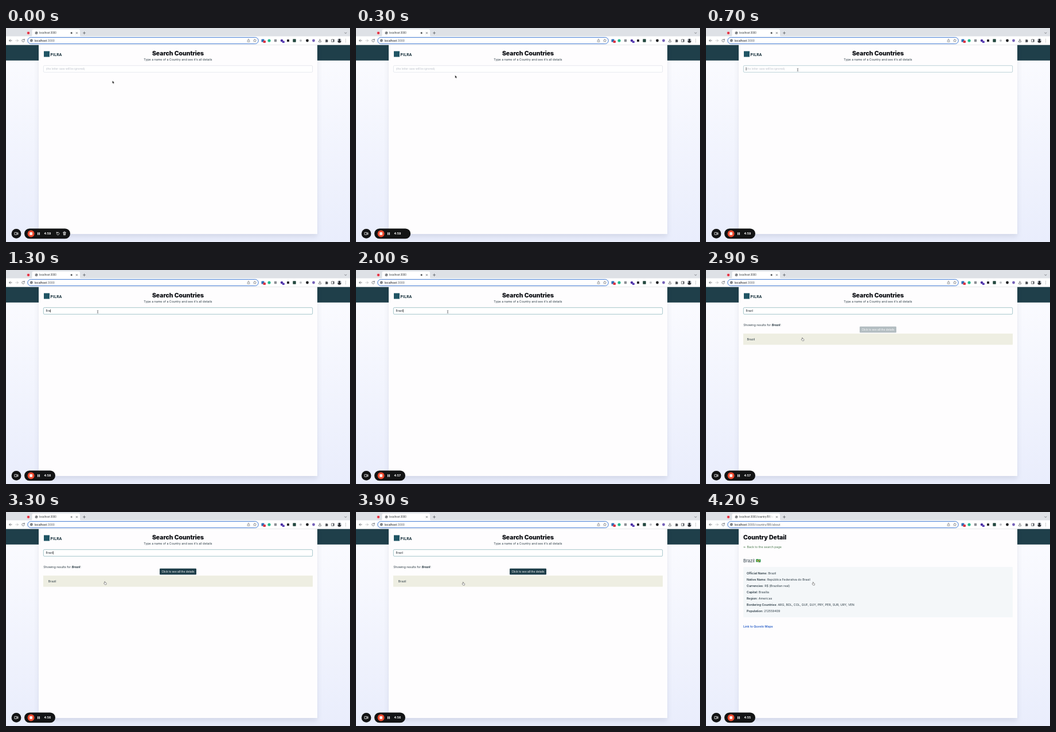
Write an HTML page that moves like this. It is 600 px wide and 374 px high and loops after 4300 ms.

```html
<!DOCTYPE html>
<html lang="en">
<head>
<meta charset="utf-8">
<title>Search Countries</title>
<style>
html, body { margin: 0; width: 100%; height: 100%; overflow: hidden; background: #fff; }
svg { display: block; width: 600px; height: 374px; }
text { font: 5.28px Inter, sans-serif; fill: #2a3a44; white-space: pre; }
.ui { font-family: Roboto, sans-serif; fill: #5f6368; }
.tab { font-size: 4.55px; fill: #3c4043; }
.url { font-size: 5.35px; }
.host { fill: #202124; }
.h1 { font-size: 10.5px; font-weight: 800; fill: #0b0d12; stroke: #0b0d12; stroke-width: .15; }
.h2 { font-size: 7.6px; }
.brand { font: 700 7px "Open Sans", sans-serif; fill: #1d3540; }
.field { font-size: 4.65px; fill: #1c242b; }
.hint { fill: #b9bec8; }
.tip { font-size: 4.75px; fill: #fff; }
.b { font-weight: 600; }
.query { font-weight: 700; font-style: italic; }
.back { fill: #47764a; }
.link { font-weight: 600; fill: #2d62c8; }
.timer { font-size: 5.2px; font-weight: 700; fill: #fff; }
.mid { text-anchor: middle; }
.line { fill: none; stroke: #50545a; stroke-width: .75; stroke-linecap: round; stroke-linejoin: round; }
.thin { stroke-width: .5; }
.bold { stroke-width: 1.3; }
.white { stroke: #fff; }
.card { filter: drop-shadow(0 5px 4px rgba(30, 35, 70, .1)); }
</style>
</head>
<body>
<svg viewBox="0 0 600 374">
  <defs>
    <linearGradient id="sky" x2="0" y2="1">
      <stop offset="0" stop-color="#fdfdff"/>
      <stop offset="1" stop-color="#e9edfc"/>
    </linearGradient>
    <linearGradient id="fade" gradientUnits="userSpaceOnUse" x1="108" x2="118">
      <stop offset="0" stop-color="#fff" stop-opacity="0"/>
      <stop offset="1" stop-color="#fff"/>
    </linearGradient>
    <g id="globe">
      <circle r="2.4" fill="#5f6368"/>
      <path d="M-1.7-.7Q-.5 0 0-1.5M-1 1.6Q0 .1 1.6.6" fill="none" stroke="#fff" stroke-width=".6"/>
    </g>
  </defs>

  <!-- page backdrop -->
  <rect width="600" height="374" fill="url(#sky)"/>
  <rect y="29" width="600" height="27.8" fill="#1f3f4a"/>
  <rect class="card" x="57" y="29" width="486" height="331" fill="#fefdfe"/>

  <!-- browser -->
  <rect width="600" height="15" fill="#dee1e6"/>
  <rect y="14.5" width="600" height="15" fill="#fff"/>
  <rect y="29" width="600" height=".6" fill="#d9dce0"/>
  <path d="M43 15Q45.5 15 45.5 12.5V5Q45.5 2.5 48 2.5H126.5Q129 2.5 129 5V12.5Q129 15 131.5 15Z" fill="#fff"/>
  <circle cx="39" cy="8.7" r="2.9" fill="#f3b9bd"/>
  <circle cx="39" cy="8.7" r="2" fill="#e0263a"/>
  <use href="#globe" x="53" y="8.7"/>
  <text id="tab" class="ui tab" x="58" y="10.3"></text>
  <rect id="tabFade" x="108" y="5" width="20" height="8" fill="url(#fade)"/>
  <g id="speaker">
    <path d="M112.7 7.8h1l1.3-1.1v4l-1.3-1.1h-1z" fill="#33363a"/>
    <path class="line thin" d="M115.9 7.7q.9 1 0 2"/>
  </g>
  <path class="line" d="M122.2 7.4l2.6 2.6m0-2.6l-2.6 2.6M134.5 8.7h4m-2-2v4M590.7 8l1.6 1.6L593.9 8"/>
  <path class="line" d="M10.2 22H5.7m2-2.1L5.6 22l2.1 2.1M32 20.7a2.3 2.3 0 1 0 .3 2M32.3 19.2v1.7h-1.7"/>
  <path class="line" opacity=".4" d="M16.8 22h4.5m-2-2.1l2.1 2.1l-2.1 2.1"/>
  <rect x="37.8" y="16.4" width="402.4" height="11.2" rx="5.6" fill="#fff" stroke="#3f78d2"/>
  <use href="#globe" x="44.3" y="22"/>
  <text class="ui url" x="49.5" y="23.9"><tspan class="host">localhost</tspan>:3000<tspan id="path"></tspan></text>
  <path class="line thin" d="M421.7 21.500h-.6v3h3.800v-3h-.6M423 23v-3.700m-1.100 1l1.100-1.100l1.100 1.100"/>
  <path class="line thin" d="M434 19.400l.8 1.700l1.900.2l-1.400 1.300l.4 1.900l-1.700-1l-1.700 1l.4-1.900l-1.400-1.300l1.900-.2z"/>
  <g id="extensions"></g>
  <path d="M557 20.6h1.2a.9.9 0 0 1 1.7 0h1.3v1.3a.9.9 0 0 1 0 1.7v1.1H557v-1.2a.9.9 0 0 0 0-1.7z" fill="#4a4d52"/>
  <path class="line" d="M547.5 19.500v2.800m-1.200-1.200l1.200 1.200l1.200-1.200M545.5 22.700v1.700h4v-1.700M568 20h4.200v4.200H568z"/>
  <path d="M570.5 20h1.700v4.200h-1.700z" fill="#50545a"/>
  <circle cx="581.5" cy="22" r="3.7" fill="#bfc4ca"/>
  <path d="M578.2 23.700q3.300-3.200 6.600 0a3.700 3.700 0 0 1-6.600 0" fill="#24272c"/>
  <circle cx="581.5" cy="20.700" r="1.700" fill="#24272c"/>
  <path class="line" d="M592.5 19.800v.01m0 2.190v.01m0 2.190v.01"/>

  <!-- search -->
  <g id="search">
    <rect x="66" y="40.500" width="10" height="10" fill="#1f5464"/>
    <text class="brand" x="77.300" y="49.200">PILRA</text>
    <text class="h1 mid" x="300" y="48.300">Search Countries</text>
    <text class="mid" x="300" y="57.200">Type a name of a Country and see it's all details</text>
    <rect x="65.400" y="65.700" width="469.200" height="11.600" rx="1.500" fill="#fff" stroke="#d5d9e2" stroke-width=".6"/>
    <rect id="focus" x="65.400" y="65.700" width="469.200" height="11.600" rx="1.500" fill="none" stroke="#8ebcc1" stroke-width=".7"/>
    <text id="hint" class="field hint" x="69.600" y="73.200">(the letter case will be ignored)</text>
    <text id="typed" class="field" x="69.600" y="73.200"></text>
    <rect id="caret" y="68.600" width=".6" height="5.600" fill="#111"/>
    <g id="results">
      <text x="65.200" y="97.800">Showing results for <tspan class="query">Brazil</tspan>:</text>
      <rect x="65.200" y="111.500" width="469.600" height="18.800" fill="#f6f6ec" stroke="#eeeee2" stroke-width=".4"/>
      <rect id="hover" x="65" y="111.400" width="470" height="19" fill="#eeeee2"/>
      <text id="item" y="122.900">Brazil</text>
      <g id="tip">
        <rect x="268" y="98.700" width="64" height="10.700" rx="1.200" fill="#1f3f4a"/>
        <text class="tip mid" x="300" y="105.700">Click to see all the details</text>
      </g>
    </g>
  </g>

  <!-- country -->
  <g id="detail">
    <text class="h1" x="65" y="48.300">Country Detail</text>
    <text class="back" x="65" y="63">← Back to the search page</text>
    <text class="h2" x="65" y="87.600">Brazil</text>
    <path d="M87.300 82.600q2-.8 4 0t4 0v5q-2 .8-4 0t-4 0z" fill="#26914a"/>
    <path d="M88 85.100l3.300-1.800l3.300 1.800l-3.300 1.800z" fill="#f1d23c"/>
    <circle cx="91.300" cy="85.100" r="1" fill="#27407f"/>
    <rect x="65" y="96" width="470" height="88" rx="1" fill="#f4f7f9"/>
    <g id="facts"></g>
    <text class="link" x="65" y="201.800">Link to Quvelo Maps</text>
  </g>

  <!-- recorder -->
  <circle cx="18" cy="359.400" r="8.400" fill="#131415"/>
  <path class="line white" d="M15.300 357.300h3.700v4h-3.700zM19 358.700l2-1.100v3.400l-2-1.100"/>
  <rect id="pill" x="32" y="350.500" height="17.800" rx="8.900" fill="#131415"/>
  <circle cx="43.600" cy="359.400" r="6" fill="#ee4b30"/>
  <rect x="41.200" y="357" width="4.800" height="4.800" rx=".8" fill="#fff"/>
  <path class="line white bold" d="M55.700 357.600v3.600m2.600-3.600v3.600"/>
  <text id="timer" class="timer" x="66.600" y="361.300"></text>
  <g id="tools" class="line white">
    <path d="M88.500 358.200a2.300 2.300 0 1 1-.1 2M88.300 356.600v1.700h1.700"/>
    <path d="M99.600 357.300h4.800M101 357v-.8h2v.8M100.200 357.500l.3 4.300h3l.3-4.300M101.400 359v1.500m1.200-1.500v1.500"/>
  </g>

  <!-- pointer: arrow, text beam, hand -->
  <g id="pointer">
    <path d="M0 0v5l1.200-1l.8 1.700l.9-.4l-.8-1.600h1.600z" fill="#111" stroke="#fff" stroke-width=".4"/>
    <path class="line thin" d="M-.9-2.500Q0-2.500 0-1.800V1.800Q0 2.500-.9 2.500M.9-2.500Q0-2.500 0-1.800V1.800Q0 2.500.9 2.500"/>
    <path d="M-.6.600q.6-.8 1.200 0v1.600l1.800.5q.6.200.5.900L2.500 5.700H-.1L-1.800 3.500q.2-.7 1.200-.2z" fill="#fff" stroke="#333" stroke-width=".5"/>
  </g>
</svg>

<script>
const LOOP = 4300, STEP = 100, OPEN = 4000;
const $ = id => document.getElementById(id);
const set = (id, attrs) => { for (const k in attrs) $(id).setAttribute(k, attrs[k]); };
const show = (id, on) => set(id, { opacity: Number(on) });
const ramp = (t, a, b) => Math.min(1, Math.max(0, (t - a) / (b - a)));
const ease = p => p * p * (3 - 2 * p);

// [x, colour, corner radius, size]
const extensions = [
  [448, '#2f6fb7', .6, 5], [459, '#25b58a', 2.6, 5.2], [470, '#8b8f95', .6, 4.4],
  [481, '#4b2fa3', 2.3, 4.6], [492, '#26282c', .4, 4], [503, '#23483f', .6, 5.4],
  [514, '#bfc2c6', 2, 4], [525.5, '#1b1d20', 2.4, 4.8], [536.5, '#7561b8', 2.4, 4.8]
];
$('extensions').innerHTML = extensions.map(([x, fill, r, s]) =>
  `<rect x="${x - s / 2}" y="${22 - s / 2}" width="${s}" height="${s}" rx="${r}" fill="${fill}"/>`
).join('') +
  '<rect x="448.5" y="22" width="4.5" height="4" rx=".7" fill="#dc3545"/>' +
  '<rect x="481.8" y="22.5" width="4" height="3.6" rx=".7" fill="#5a3fb5"/>';

const facts = {
  'Official Name': 'Brazil',
  'Native Name': 'República Federativa do Brasil',
  'Currencies': 'R$ (Brazilian real)',
  'Capital': 'Brasília',
  'Region': 'Americas',
  'Bordering Countries': 'ARG, BOL, COL, GUF, GUY, PRY, PER, SUR, URY, VEN',
  'Population': '212559409'
};
$('facts').innerHTML = Object.entries(facts).map(([name, value], i) =>
  `<text x="71" y="${108.8 + i * 11.1}"><tspan class="b">${name}:</tspan> ${value}</text>`
).join('');

const keyTimes = [1000, 1100, 1300, 1600, 1700, 1900];
const route = [
  [0, 185.5, 92], [600, 160, 73], [2400, 160, 73], [2900, 168, 118],
  [3300, 172.3, 121.2], [3600, 186.8, 122.2], [LOOP, 186.8, 122.2]
];

function pointerAt(t) {
  const i = route.findIndex(p => p[0] > t);
  const [a, x0, y0] = route[i - 1], [b, x1, y1] = route[i];
  const p = ease(ramp(t, a, b));
  return [x0 + (x1 - x0) * p, y0 + (y1 - y0) * p];
}

function drawPointer(t) {
  const [x, y] = pointerAt(t);
  const shape = y < 79 ? 1 : y < 111 ? 0 : 2;
  set('pointer', { transform: `translate(${x} ${y})` });
  [...$('pointer').children].forEach((el, i) => el.setAttribute('opacity', Number(i === shape)));
  show('pointer', t !== 2400);
}

function draw(t) {
  const detail = t >= OPEN;
  show('search', !detail);
  show('detail', detail);
  show('tabFade', detail);
  $('tab').textContent = detail ? 'localhost:3000/country/BR/ab' : 'localhost:3000';
  $('path').textContent = detail ? '/country/BR/about' : '';
  show('speaker', 1 - ramp(t, 3100, 3600));

  const typed = 'Brazil'.slice(0, keyTimes.filter(k => k <= t).length);
  $('typed').textContent = typed;
  show('hint', !typed);
  show('focus', ramp(t, 500, 800));
  set('caret', { x: 69.7 + (typed ? $('typed').getComputedTextLength() : 0) });
  show('caret', (t >= 700 && t < 2400) || (t >= 3000 && t < 3500));

  show('results', t >= 2400);
  show('hover', ramp(t, 2600, 2900));
  show('tip', ramp(t, 2800, 3100));
  set('item', { x: 69 + 4.8 * ease(ramp(t, 2700, 3100)) });

  const open = 1 - ease(ramp(t, 0, 500));
  set('pill', { width: 54 + 26 * open });
  show('tools', ramp(open, .5, 1));
  $('timer').textContent = '4:' + (59 - Math.floor(t / 1000));
  drawPointer(t);
}

let start;
function tick(now) {
  start ??= now;
  const t = (now - start) % LOOP;
  draw(Math.floor(t / STEP) * STEP);
  requestAnimationFrame(tick);
}
draw(0);
requestAnimationFrame(tick);
</script>
</body>
</html>
```
